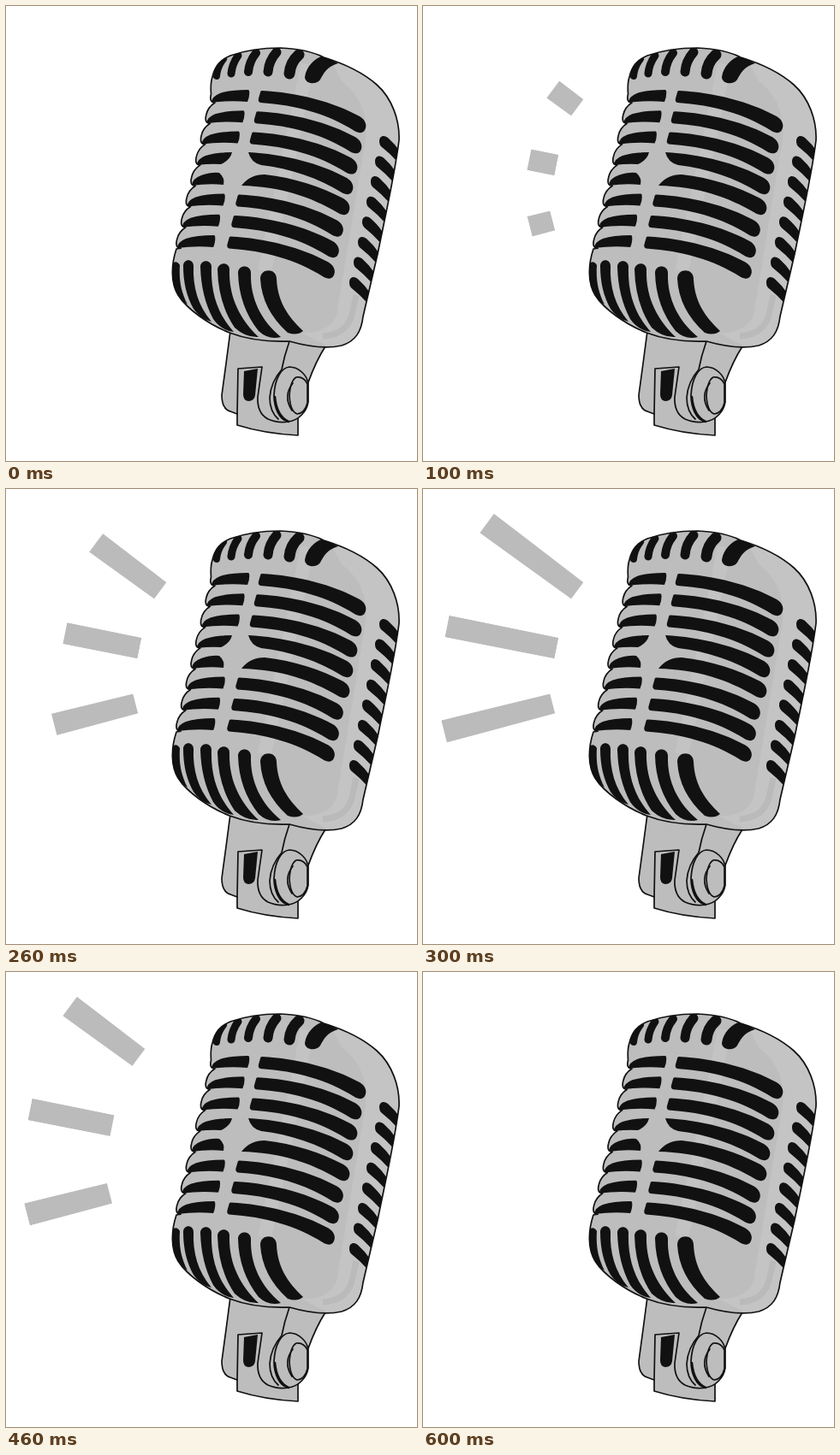
An HTML page without scripts that plays this animation: 480 px wide and 532 px high, repeating every 0.7 s.

```html
<!DOCTYPE html>
<html lang="en">
<head>
<meta charset="utf-8">
<title>Microphone</title>
<style>
html, body { margin: 0; width: 100%; height: 100%; overflow: hidden; background: #fff; }
svg { display: block; width: 480px; height: 532px; }
.bar { fill: #bbb; animation: shout 700ms step-end infinite; }
.ink { fill: #111; }
.line, .metal { stroke: #111; stroke-width: 1.7; stroke-linejoin: round; stroke-linecap: round; }
.line { fill: none; }
.metal { fill: #bdbdbd; }
.bold { stroke-width: 2.6; }
.slit { fill: none; stroke: #111; stroke-linecap: round; }

/* Bars grow away from the mic, then vanish from the mic end */
@keyframes shout {
  0% { clip-path: inset(0 0 0 100%); }
  14.28% { clip-path: inset(0 0 0 var(--in1)); }
  28.57% { clip-path: inset(0 0 0 var(--in2)); }
  42.85% { clip-path: inset(0 0 0 0); }
  57.14% { clip-path: inset(0 var(--out1) 0 0); }
  71.42% { clip-path: inset(0 var(--out2) 0 0); }
  85.71%, 100% { clip-path: inset(0 100% 0 0); }
}
</style>
</head>
<body>
<svg viewBox="0 0 480 532">
  <defs>
    <path id="body" d="M244 113c-5 0-6-4-4.5-10C239 96 239 89 241 83C244 70 250 63 262 58C282 51 302 49 320 49
      C340 50 358 53 371 60C397 68 416 77 433 92C451 108 460 134 459 157C454 198 443 245 434 290
      L417 363C415 381 408 392 392 397C374 401 352 398 331 392C305 393 282 390 261 382
      C236 372 211 354 201 338C192 323 193 302 199 284L204.1 283.1
      c-5 0-6-4-4.5-10c1.5-7 5-11 10.2-14.3c-5 0-6-4-4.5-10c1.5-7 5-11 10.2-14.3
      c-5 0-6-4-4.5-10c1.5-7 5-11 10.2-14.3c-5 0-6-4-4.5-10c1.5-7 5-11 10.2-14.3
      c-5 0-6-4-4.5-10c1.5-7 5-11 10.2-14.3c-5 0-6-4-4.5-10c1.5-7 5-11 10.2-14.3
      c-5 0-6-4-4.5-10c1.5-7 5-11 10.2-14.3z"/>
    <clipPath id="inside"><use href="#body"/></clipPath>
    <path id="left" d="M283 98Q262 98 250 102Q240 106 240 113Q262 110 282 112Q285 105 284 99z"/>
    <path id="right" d="M299 99C340 101 382 112 413 129C420 133 422 140 419 145C417 149 412 149 407 146
      C375 126 340 116 297 113Q294 112 295 108L297 101Q297 99 299 99z"/>
    <path id="side" d="M436 158C436 152 441 150 446 154Q454 161 460 170L457 182Q448 172 439 165Q436 163 436 158z"/>
  </defs>

  <g transform="translate(74.5 40) rotate(36.7)">
    <polygon class="bar" points="0,-13.9 132,-11.9 132,11.9 0,13.9" style="--in1:73%;--in2:29%;--out1:24%;--out2:61%"/>
  </g>
  <g transform="translate(28 160.5) rotate(11.3)">
    <polygon class="bar" points="0,-12.9 130.5,-12.3 130.5,12.3 0,12.9" style="--in1:75%;--in2:32%;--out1:25%;--out2:63%"/>
  </g>
  <g transform="translate(24.5 283.5) rotate(-14.4)">
    <polygon class="bar" points="0,-13.3 131,-11.8 131,11.8 0,13.3" style="--in1:79%;--in2:25%;--out1:24%;--out2:62%"/>
  </g>

  <!-- Stand -->
  <path class="metal" d="M262 380L257 418L252 455Q252 471 262 474L270 477V490Q302 500 341 502V474L353 440Q362 415 373 398z"/>
  <path class="line" d="M331 392Q325 409 322 425Q309 440 308 458Q308 474 318 483M270 477L271 424L299 422L294 457Q293 476 306 483Q317 488 330 486"/>
  <path class="ink" d="M278 427L294 424L291 455Q290 462 283 462Q277 461 277 454z"/>
  <path class="metal" d="M331 422C342 422 352 432 353 442V463C351 474 342 485 329 486C319 483 313 470 313 455C314 436 321 423 331 422z"/>
  <path class="line bold" d="M314 457Q316 479 330 486"/>
  <path class="metal" d="M339 434Q348 433 352 442V464Q349 476 340 477Q332 474 331 456Q332 438 339 434z"/>
  <path class="line" d="M335 441Q323 456 334 473"/>

  <!-- Head -->
  <use href="#body" fill="#bdbdbd"/>
  <g clip-path="url(#inside)">
    <path fill="#c4c4c4" d="M375 55L470 90V300L400 410L345 382Q375 384 386 362L420 155Q424 112 392 88z"/>
    <path fill="none" stroke="#c3c3c3" stroke-width="16" d="M352 68Q330 180 302 310"/>
    <path fill="none" stroke="#bababa" stroke-width="7" d="M370 386Q398 384 404 361L409 338"/>

    <!-- Crown slits -->
    <path class="slit" stroke-width="8" d="M246 82Q247 71 254 62"/>
    <path class="slit" stroke-width="9" d="M263 79Q264 68 271 58"/>
    <path class="slit" stroke-width="10" d="M283 77Q284 65 292 55"/>
    <path class="slit" stroke-width="11" d="M306 77Q307 64 316 54"/>
    <path class="slit" stroke-width="13" d="M331 79Q332 66 342 57"/>
    <path class="ink" d="M349 83C351 70 360 62 370 58L388 67C374 71 371 79 367 86C362 93 349 91 349 83z"/>

    <!-- Grille -->
    <g class="ink">
      <use href="#left"/>
      <use href="#left" x="-5.7" y="24.3"/>
      <use href="#left" x="-11.4" y="48.6"/>
      <path d="M264 171Q245 171 233 175Q223 179 223 186Q240 184 251 185Q262 180 264 171z"/>
      <path d="M217 210Q217 202 228 198Q240 194 249 195Q256 201 254 209Q237 207 217 210z"/>
      <use href="#left" x="-28.5" y="121.5"/>
      <use href="#left" x="-34.2" y="145.8"/>
      <use href="#left" x="-39.9" y="170.1"/>

      <use href="#right"/>
      <use href="#right" x="-5" y="24.2"/>
      <use href="#right" x="-10" y="48.4"/>
      <path d="M283 171C324 173 367 184 398 201C405 205 407 212 404 217C402 221 397 221 392 218C365 201 332 190 298 186Q286 183 283 171z"/>
      <path d="M275 210Q285 197 302 197C337 201 367 211 394 225C401 229 403 236 400 241C398 245 393 245 388 242C356 223 320 211 275 210z"/>
      <use href="#right" x="-26.5" y="121.5"/>
      <use href="#right" x="-31.5" y="146"/>
      <use href="#right" x="-36.5" y="170.5"/>

      <use href="#side"/>
      <use href="#side" x="-5" y="23.6"/>
      <use href="#side" x="-10" y="47.2"/>
      <use href="#side" x="-15" y="70.8"/>
      <use href="#side" x="-20" y="94.4"/>
      <use href="#side" x="-25" y="118"/>
      <use href="#side" x="-30" y="141.6"/>
      <use href="#side" x="-35" y="165.2"/>
    </g>

    <!-- Base slits -->
    <g class="ink">
      <path d="M193 302Q199 296 203 303C202 320 204 333 212 349L201 342Q192 322 193 302z"/>
      <path d="M207 304C207 295 219 295 219 304C218 328 224 350 240 369Q227 366 219 354Q207 333 207 304z"/>
      <path d="M227 305C227 296 240 296 240 305C239 335 247 360 266 381Q251 379 242 366Q228 340 227 305z"/>
      <path d="M247 308C248 299 261 299 261 308C260 340 273 366 295 387Q280 388 267 376Q248 348 247 308z"/>
      <path d="M271 312C271 302 286 302 286 312C285 342 298 368 321 387Q307 391 295 380Q272 351 271 312z"/>
      <path d="M297 319C297 306 316 306 316 319C317 344 328 362 347 380Q340 386 329 382Q299 355 297 319z"/>
    </g>
  </g>
  <use href="#body" class="line"/>
</svg>
</body>
</html>
```
